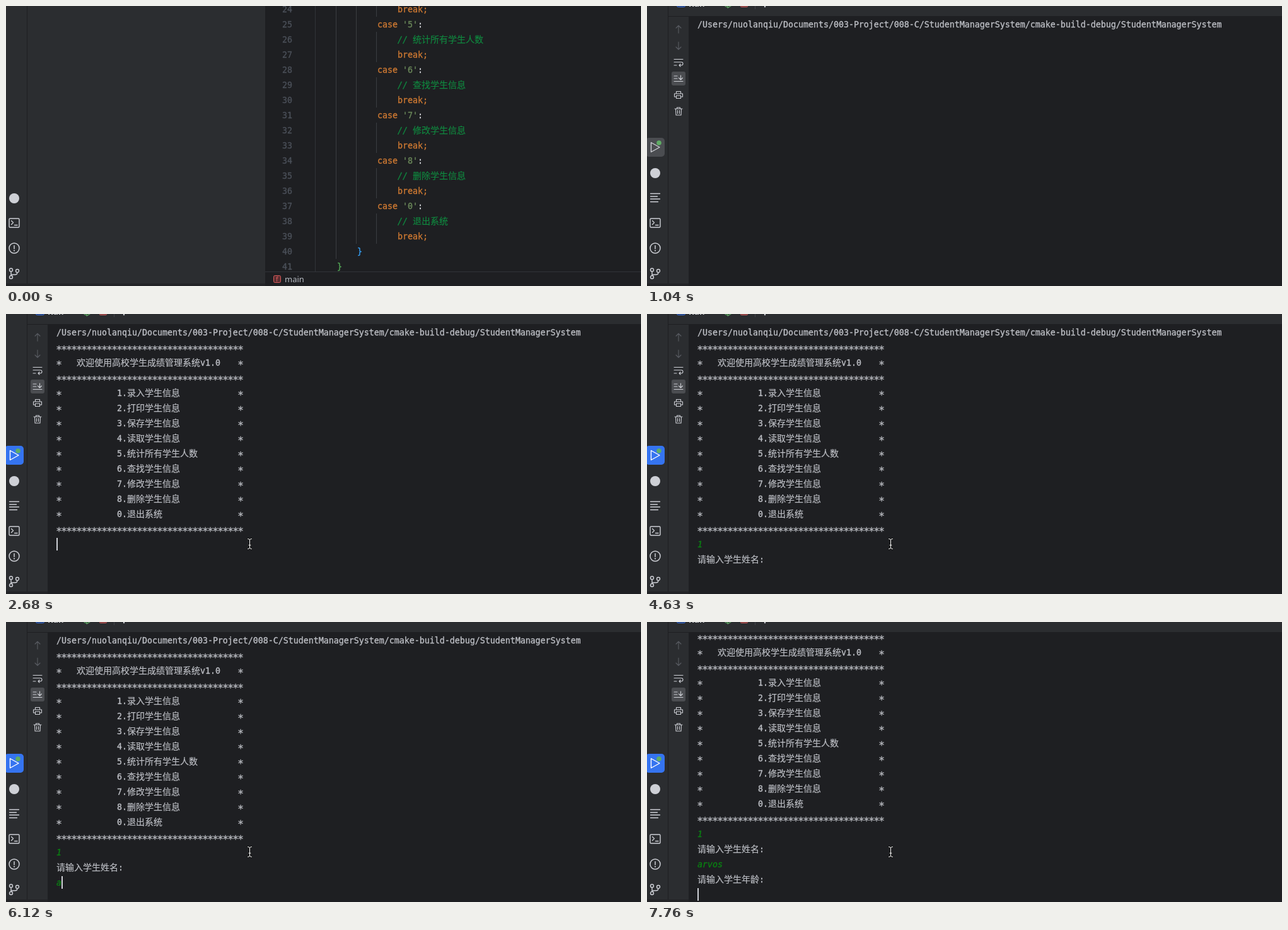
These frames come from a looping animation (1007 px wide and 444 px high, 8000 ms). An HTML page with a canvas:

```html
<!DOCTYPE html>
<html lang="zh-CN">
<head>
<meta charset="utf-8">
<title>Student manager</title>
<style>
html, body { margin: 0; width: 100%; height: 100%; overflow: hidden; background: #1e1f22; }
canvas { display: block; width: 1007px; height: 444px; }
</style>
</head>
<body>
<canvas id="stage" width="1007" height="444"></canvas>
<script>
const ctx = document.getElementById('stage').getContext('2d');
const LOOP = 8000, COL = 8, ROW = 24, LEFT = 80;
const DARK = '#1e1f22', PANEL = '#2b2d30', ICON = '#ced0d6', TEXT = '#bcbec4';
const DIM = '#5a5d63', RED = '#db5c5c', BLUE = '#3574f0', GREEN = '#5fad65';
const KEYWORD = '#cc7832', STRING = '#6a8759', COMMENT = '#10873f', INPUT = '#0a8012';
const MONO = '"DejaVu Sans Mono", monospace';
const HAN = '"Noto Sans CJK SC", "Noto Sans CJK", sans-serif';
const UI = '"Noto Sans", sans-serif';

const TYPED = 'arvos';
const TYPE_TIMES = [6120, 6720, 7020, 7160, 7310];
const POINTER = [
  [1790, 546.5, 197.5], [2090, 432.5, 300.5], [2240, 403.5, 337.5],
  [2380, 390.5, 361.5], [2530, 387.5, 364.5], [2680, 386.5, 364.5]
];
const PATH = '/Users/nuolanqiu/Documents/003-Project/008-C/StudentManagerSystem/cmake-build-debug/StudentManagerSystem';
const MENU = ['1.录入学生信息', '2.打印学生信息', '3.保存学生信息', '4.读取学生信息',
  '5.统计所有学生人数', '6.查找学生信息', '7.修改学生信息', '8.删除学生信息', '0.退出系统'];
const CASES = [['5', '统计所有学生人数'], ['6', '查找学生信息'], ['7', '修改学生信息'],
  ['8', '删除学生信息'], ['0', '退出系统']];

function rect(x, y, w, h, color) {
  ctx.fillStyle = color;
  ctx.fillRect(x, y, w, h);
}

function box(x, y, w, h, r, fill, stroke) {
  ctx.beginPath();
  ctx.roundRect(x, y, w, h, r);
  if (fill) { ctx.fillStyle = fill; ctx.fill(); }
  if (stroke) { ctx.strokeStyle = stroke; ctx.lineWidth = 1; ctx.stroke(); }
}

function disc(x, y, r, color) {
  ctx.beginPath();
  ctx.arc(x, y, r, 0, Math.PI * 2);
  ctx.fillStyle = color;
  ctx.fill();
}

function path(d, x, y, color = ICON, width = 1.2) {
  ctx.save();
  ctx.translate(x, y);
  ctx.strokeStyle = color;
  ctx.lineWidth = width;
  ctx.lineJoin = ctx.lineCap = 'round';
  ctx.stroke(new Path2D(d));
  ctx.restore();
}

// A thin outline thickens the regular cut to a medium weight.
function label(str, x, baseline, font, color, outline = 0) {
  ctx.font = font;
  ctx.fillStyle = ctx.strokeStyle = color;
  ctx.fillText(str, x, baseline);
  if (!outline) return;
  ctx.lineWidth = outline;
  ctx.lineJoin = 'round';
  ctx.strokeText(str, x, baseline);
}

function stars(count, x, y, color) {
  ctx.textAlign = 'center';
  for (let i = 0; i < count; i++) label('*', x + (i + 0.5) * COL, y + 9, '16px ' + MONO, color, 0.3);
  ctx.textAlign = 'left';
}

// Latin runs sit on the 8px grid, Han characters are 14px wide.
function mono(str, x, y, color = TEXT, style = '') {
  for (const run of str.match(/[\u3400-\u9fff]+|\*+|[^\u3400-\u9fff*]+/g) || []) {
    const han = /[\u3400-\u9fff]/.test(run);
    if (run[0] === '*') stars(run.length, x, y, color);
    else if (han) label(run, x, y + 5, '14px ' + HAN, color, 0.2);
    else label(run, x, y + 5, style + '13.29px ' + MONO, color, 0.35);
    x += run.length * (han ? 14 : COL);
  }
}

function rail(t) {
  rect(0, 0, 33, 444, PANEL);
  rect(33, 0, 1, 444, DARK);
  const building = t >= 740, running = t >= 1040;
  if (running) {
    const active = t >= 2530;
    box(-2, 209, 30, 30, 5, active ? BLUE : '#4b4d51');
    path('M-6.5-7.5 L7 0 L-6.5 7.5Z', 13, 224, active ? '#fff' : ICON, 1.4);
    disc(19, 217, 3.8, GREEN);
  }
  disc(13, building ? 265 : 305, 8, ICON);
  if (building) {
    if (t >= 890 && !running) box(-2, 289, 30, 30, 5, '#4b4d51');
    path('M-7.5-6.5H7.5 M-7.5-2H3.5 M-7.5 2H7.5 M-7.5 6.5H4.5', 13, 304, ICON, 1.3);
  }
  path('M-6.5-7H6.5Q8-7 8-5.5V5.5Q8 7 6.5 7H-6.5Q-8 7-8 5.5V-5.5Q-8-7-6.5-7Z M-4.5-3.5L-1.5-.5L-4.5 2.5 M.5 3.5H5', 13, 344, ICON, 1.4);
  path('M8 0A8 8 0 1 1-8 0A8 8 0 1 1 8 0Z M0-4V1', 13, 384, ICON, 1.5);
  disc(13, 388, 1.1, ICON);
  path('M-2.5-5.5a2.5 2.5 0 1 1-5 0a2.5 2.5 0 1 1 5 0Z M7.5-4a2.5 2.5 0 1 1-5 0a2.5 2.5 0 1 1 5 0Z M-2.5 6a2.5 2.5 0 1 1-5 0a2.5 2.5 0 1 1 5 0Z M-5-3V3.5 M5-1.5Q5 2 1 2H-5', 13, 424, ICON, 1.4);
}

function editor() {
  rect(34, 0, 377, 444, PANEL);
  rect(490, 0, 1, 421, '#313438');
  rect(523, 0, 1, 401, '#3b3d41');
  rect(555, 0, 1, 377, '#3b3d41');
  rect(587, 0, 1, 17, '#3b3d41');
  for (let n = 24; n <= 41; n++) mono(String(n), 438, 5 + (n - 24) * ROW, '#4b5059');
  mono('break;', 621, 5, KEYWORD);
  CASES.forEach(([key, note], i) => {
    const y = 29 + i * 3 * ROW;
    rect(587, y + 12, 1, 48, '#3b3d41');
    mono('case', 589, y, KEYWORD);
    mono(`'${key}'`, 629, y, STRING);
    mono(':', 653, y, '#d5d7dc');
    mono('//', 621, y + ROW, COMMENT, 'italic ');
    mono(note, 645, y + ROW, COMMENT);
    mono('break;', 621, y + 2 * ROW, KEYWORD);
  });
  mono('}', 557, 389, '#359ff4');
  mono('}', 525, 413, '#54a857');
  rect(411, 421, 596, 23, DARK);
  rect(411, 421, 596, 1, '#313338');
  box(424.5, 427.5, 11, 11, 2, '#5a2d30', RED);
  label('f', 428, 437, '10px ' + UI, RED);
  label('main', 442, 438, '13px ' + UI, '#b4b8bf');
}

function toolbar(y) {
  path('M0 6V-6M-4-2L0-6L4-2', 50, y, DIM, 1.1);
  path('M0-6V6M-4 2L0 6L4 2', 50, y + 26, DIM, 1.1);
  path('M-7-4.5H7 M-7 0H4.5Q7 0 7 2.5T4.5 5H1 M3 3L1 5L3 7 M-7 5H-3', 50, y + 52, ICON, 1.1);
  box(39, y + 67, 22, 22, 3, '#4b4d51');
  path('M-7-4H-2M-7 0H-2M-7 4.5H7M3.5-5V2M.5-1L3.5 2L6.5-1', 50, y + 78, ICON, 1.1);
  path('M-3.5-2V-5.5H3.5V-2 M-3.5 3H-6.5V-2H6.5V3H3.5 M-3.5 1H3.5V5.5H-3.5Z', 50, y + 104, ICON, 1.1);
  path('M-6-4H6 M-2.5-4V-6H2.5V-4 M-4.5-4L-4 6H4L4.5-4 M-1.5-1.5V3.5 M1.5-1.5V3.5', 50, y + 130, ICON, 1.1);
}

function panelFrame() {
  rect(34, 0, 973, 16, PANEL);
  rect(34, 16, 973, 1, DARK);
  rect(34, 17, 32, 427, PANEL);
}

function buildPanel() {
  panelFrame();
  rect(67, 17, 940, 24, PANEL);
  label('Messages', 46, 1, 'bold 13px ' + UI, '#dfe1e5');
  label('Build', 138, 1, '13px ' + UI, '#dfe1e5');
  path('M-3-3L3 3M3-3L-3 3', 186, -3, '#9da0a8', 1);
  box(127, 14, 74, 3, 1.5, '#6f737a');
  box(44.5, 31.5, 11, 11, 1, '#5e3838', RED);
  rect(40, 53, 20, 1, '#43454a');
  toolbar(70);
}

function runHeader() {
  panelFrame();
  box(47.5, -10.5, 13, 12, 2, '#25324d', BLUE);
  label('Run', 66, 1, 'bold 13px ' + UI, '#dfe1e5');
  path('M-6-2Q-4 3 0 2.5 M0-6L8-1L0 4Z', 128, -1, GREEN, 1.2);
  box(148.5, -10.5, 11, 12, 1, '#5e3838', RED);
  rect(171, 0, 1, 5, '#43454a');
  disc(187, 1, 1.2, ICON);
  toolbar(37);
}

function caret(t, typedCount) {
  const draw = (col, y) => rect(LEFT + col * COL, y - 10, 2, 20, ICON);
  if (t >= 7760) draw(0, 461);
  else if (t >= 6120) draw(typedCount, 413);
  else if (t >= 5070 && t < 5520 || t >= 3580 && t < 4630) draw(0, 413);
  else if (t >= 2530 && t < 3580) draw(t < 3280 ? 0 : 1, 365);
}

function consoleText(t) {
  const typedCount = TYPE_TIMES.filter(at => t >= at).length;
  const rule = '*'.repeat(37);
  ctx.save();
  ctx.beginPath();
  ctx.rect(67, 17, 940, 427);
  ctx.clip();
  if (t >= 7760) ctx.translate(0, -29);
  mono(PATH, LEFT, 29);
  if (t >= 1640) {
    [53, 101, 341].forEach(y => mono(rule, LEFT, y));
    const item = (str, x, y) => {
      mono('*', LEFT, y);
      mono(str, x, y);
      mono('*', LEFT + 36 * COL, y);
    };
    item('欢迎使用高校学生成绩管理系统v1.0', 112, 77);
    MENU.forEach((str, i) => item(str, 176, 125 + i * ROW));
  }
  if (t >= 3280) mono('1', LEFT, 365, INPUT, 'italic ');
  if (t >= 3580) mono('请输入学生姓名:', LEFT, 389);
  mono(TYPED.slice(0, typedCount), LEFT, 413, INPUT, 'italic ');
  if (t >= 7760) mono('请输入学生年龄:', LEFT, 437);
  caret(t, typedCount);
  ctx.restore();
}

function candidates() {
  box(80, 433, 448, 30, 6, '#fff');
  box(83, 436, 40, 24, 5, '#0cb076');
  const font = '16px ' + HAN;
  label('啊', 100, 454, 'bold ' + font, '#fff');
  label("'", 233, 454, font, '#222');
  [['阿', 146], ['嗄', 270], ['爱', 316], ['昂', 362], ['吖', 408], ['锕', 454]]
    .forEach(([ch, x]) => label(ch, x, 454, font, '#222'));
}

function pointer(t) {
  const step = POINTER.filter(([at]) => t >= at).pop();
  if (!step) return;
  const beam = 'M-3-8Q0-8 0-6Q0-8 3-8 M0-6V6 M-3 8Q0 8 0 6Q0 8 3 8 M-1.5 2H1.5';
  path(beam, step[1], step[2], '#111', 2.4);
  path(beam, step[1], step[2], '#fff', 1);
}

function render(t) {
  rect(0, 0, 1007, 444, DARK);
  if (t < 890) editor();
  else if (t < 1040) buildPanel();
  else runHeader();
  rail(t);
  rect(0, 440, t < 890 ? 411 : 66, 4, '#232427');
  if (t >= 1040) consoleText(t);
  if (t >= 4770 && t < 6120) candidates();
  pointer(t);
}

const start = performance.now();
function tick() {
  render((performance.now() - start) % LOOP);
  requestAnimationFrame(tick);
}
tick();
</script>
</body>
</html>
```
